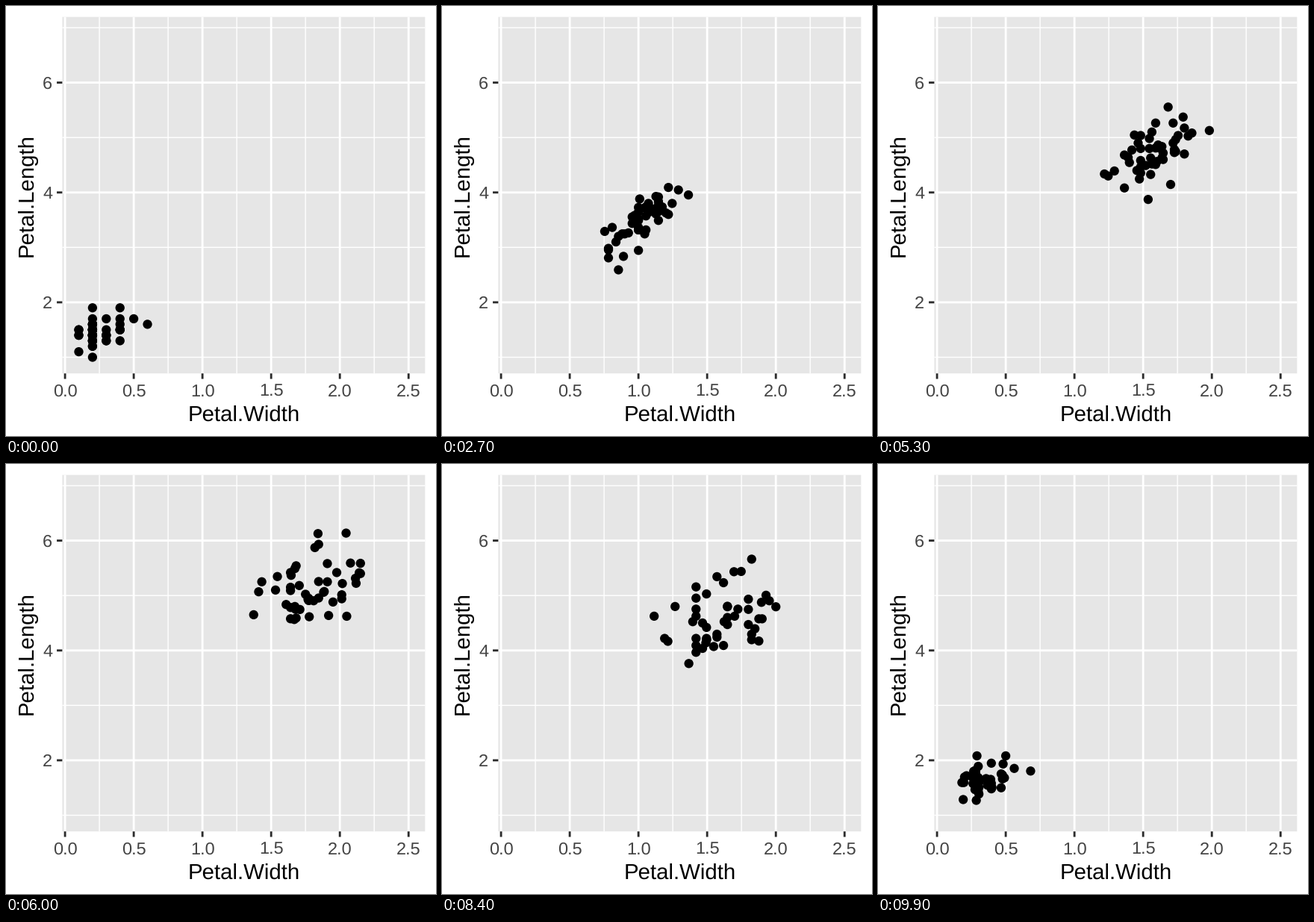
Animation, 576 px wide and 576 px high, one loop 10000 ms. Source, as a matplotlib script:

```python
import matplotlib.pyplot as plt
import numpy as np
from matplotlib.animation import FuncAnimation

plt.rcParams["font.family"] = "Liberation Sans"
plt.rcParams["text.hinting"] = "none"

SIZE, DPI = 576, 192
LEFT, RIGHT, TOP, BOTTOM = 75.4, 561.33, 14.67, 492.2
XLIM, YLIM = (-0.02, 2.62), (0.705, 7.195)
PX = 72 / DPI  # points per pixel

# Iris petals in row order, in millimetres
setosa_width = [
    2, 2, 2, 2, 2, 4, 3, 2, 2, 1, 2, 2, 1, 1, 2, 4, 4, 3, 3, 3, 2, 4, 2, 5, 2,
    2, 4, 2, 2, 2, 2, 4, 1, 2, 2, 2, 2, 1, 2, 2, 3, 3, 2, 6, 4, 3, 2, 2, 2, 2]
setosa_length = [
    14, 14, 13, 15, 14, 17, 14, 15, 14, 15, 15, 16, 14, 11, 12, 15, 13, 14, 17,
    15, 17, 15, 10, 17, 19, 16, 16, 15, 14, 16, 16, 15, 15, 14, 15, 12, 13, 14,
    13, 15, 13, 13, 13, 16, 19, 14, 16, 14, 15, 14]
versicolor_width = [
    14, 15, 15, 13, 15, 13, 16, 10, 13, 14, 10, 15, 10, 14, 13, 14, 15, 10, 15,
    11, 18, 13, 15, 12, 13, 14, 14, 17, 15, 10, 11, 10, 12, 16, 15, 16, 15, 13,
    13, 13, 12, 14, 12, 10, 13, 12, 13, 13, 11, 13]
versicolor_length = [
    47, 45, 49, 40, 46, 45, 47, 33, 46, 39, 35, 42, 40, 47, 36, 44, 45, 41, 45,
    39, 48, 40, 49, 47, 43, 44, 48, 50, 45, 35, 38, 37, 39, 51, 45, 45, 47, 44,
    41, 40, 44, 46, 40, 33, 42, 42, 42, 43, 30, 41]
virginica_width = [
    25, 19, 21, 18, 22, 21, 17, 18, 18, 25, 20, 19, 21, 20, 24, 23, 18, 22, 23,
    15, 23, 20, 20, 18, 21, 18, 18, 18, 21, 16, 19, 20, 22, 15, 14, 23, 24, 18,
    18, 21, 24, 23, 19, 23, 25, 23, 19, 20, 23, 18]
virginica_length = [
    60, 51, 59, 56, 58, 66, 45, 63, 58, 61, 51, 53, 55, 50, 51, 53, 55, 67, 69,
    50, 57, 49, 67, 49, 57, 60, 48, 49, 56, 58, 61, 64, 56, 51, 56, 61, 56, 55,
    48, 54, 56, 51, 51, 59, 57, 52, 50, 52, 54, 51]

states = [np.column_stack(pair) / 10 for pair in (
    (setosa_width, setosa_length),
    (versicolor_width, versicolor_length),
    (virginica_width, virginica_length))]

fig = plt.figure(figsize=(SIZE / DPI, SIZE / DPI), dpi=DPI, facecolor="white")
ax = fig.add_axes([0, 0, 1, 1])
ax.set_xlim(0, SIZE)
ax.set_ylim(SIZE, 0)
ax.axis("off")


def to_px(x, y):
    u = (np.asarray(x) - XLIM[0]) / (XLIM[1] - XLIM[0])
    v = (np.asarray(y) - YLIM[0]) / (YLIM[1] - YLIM[0])
    return LEFT + u * (RIGHT - LEFT), BOTTOM + v * (TOP - BOTTOM)


def line(xs, ys, color, width, z):
    ax.plot(xs, ys, color=color, lw=width * PX, zorder=z,
            solid_capstyle="butt", snap=False)


def label(x, y, text, size, color, ha="center", rotation=0):
    ax.text(x, y, text, fontsize=size, color=color, ha=ha, va="baseline",
            rotation=rotation, rotation_mode="anchor")


def grid(xs, ys, width, z):
    for x in to_px(xs, 0)[0]:
        line([x, x], [TOP, BOTTOM], "white", width, z)
    for y in to_px(0, ys)[1]:
        line([LEFT, RIGHT], [y, y], "white", width, z)


ax.add_patch(plt.Rectangle((LEFT, TOP), RIGHT - LEFT, BOTTOM - TOP,
                           fc="#E6E6E6", ec="none", snap=False, zorder=0))

x_ticks, y_ticks = np.arange(0, 2.6, 0.5), np.array([2, 4, 6])
grid(np.arange(0.25, 2.5, 0.5), np.array([1, 3, 5, 7]), 1.42, 1)
grid(x_ticks, y_ticks, 2.84, 2)

TICK, TICK_COLOR, TEXT_COLOR = 7.33, "#2B2B2B", "#444444"
for v in x_ticks:
    x = to_px(v, 0)[0]
    line([x, x], [BOTTOM, BOTTOM + TICK], TICK_COLOR, 2.84, 3)
    label(x, 522.3, f"{v:.1f}", 8.8, TEXT_COLOR)
for v in y_ticks:
    y = to_px(0, v)[1]
    line([LEFT - TICK, LEFT], [y, y], TICK_COLOR, 2.84, 3)
    label(62.2, y + 8.4, str(v), 8.8, TEXT_COLOR, ha="right")

label((LEFT + RIGHT) / 2, 555.6, "Petal.Width", 11, "black")
label(35.8, (TOP + BOTTOM) / 2, "Petal.Length", 11, "black", rotation=90)

n = len(states[0])
dots = ax.scatter(np.zeros(n), np.zeros(n), s=np.full(n, (12.3 * PX) ** 2),
                  c="black", linewidths=0, zorder=5)


def update(i):
    # Hold each species, then slide linearly to the next one
    phase = np.interp(i, [0, 11, 33, 45, 67, 79, 100], [0, 0, 1, 1, 2, 2, 3])
    k = int(phase)
    t = phase - k
    pos = (1 - t) * states[k] + t * states[(k + 1) % 3]
    dots.set_offsets(np.column_stack(to_px(pos[:, 0], pos[:, 1])))
    return [dots]


anim = FuncAnimation(fig, update, frames=100, interval=100, repeat=True,
                     repeat_delay=0, blit=False)
plt.show()
```
